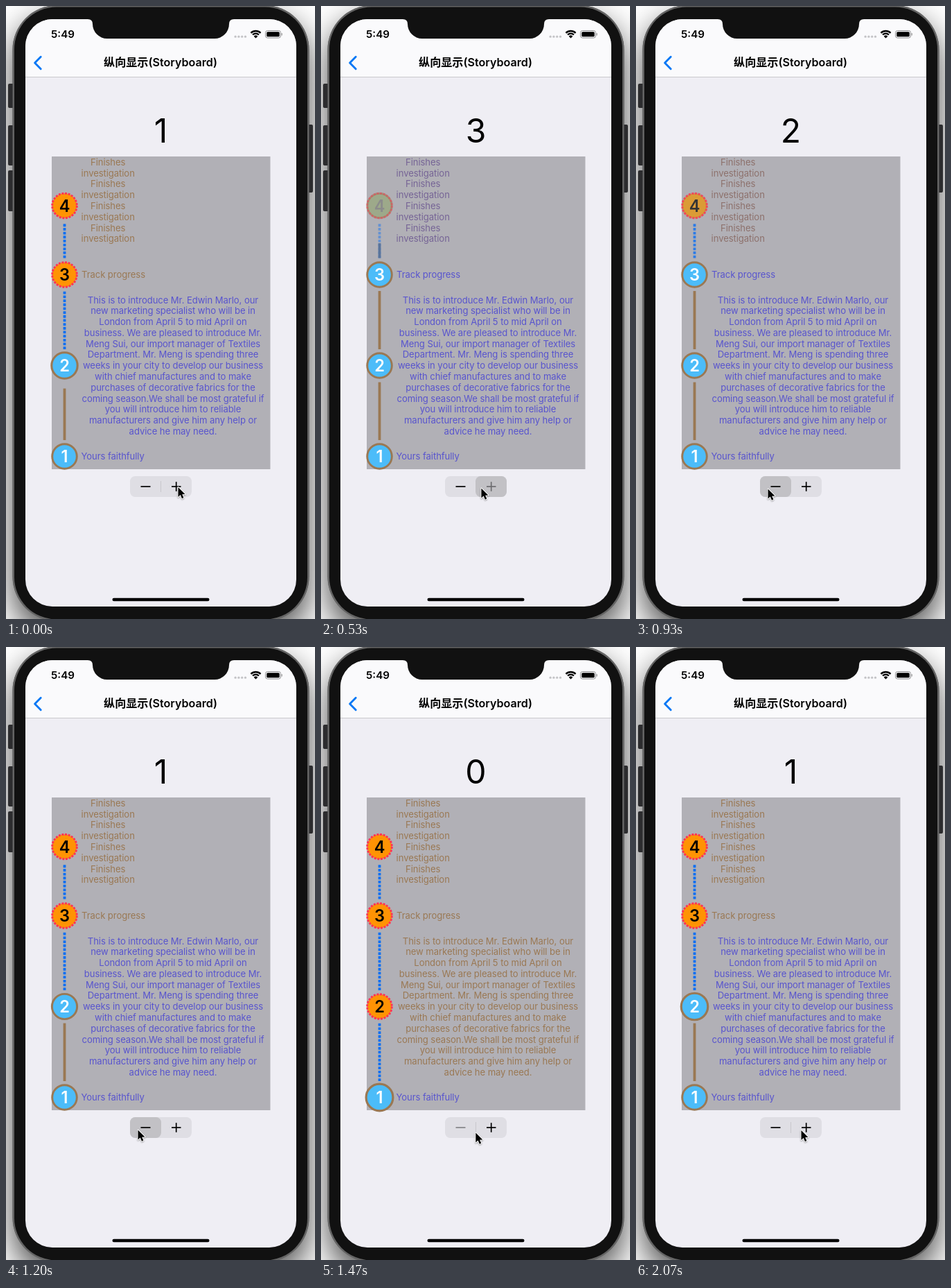
Write an HTML page with a canvas that moves like this. It is 446 by 884 pixels and loops after 2140 ms.

```html
<!DOCTYPE html>
<html lang="en">
<head>
<meta charset="utf-8">
<style>
html, body { margin: 0; width: 100%; height: 100%; overflow: hidden; background: #fff; }
canvas { display: block; width: 446px; height: 884px; }
</style>
</head>
<body>
<canvas id="stage"></canvas>
<script>
const W = 446, H = 884, LOOP = 2140, FPS = 15;
const canvas = document.getElementById('stage');
const dpr = window.devicePixelRatio || 1;
canvas.width = W * dpr;
canvas.height = H * dpr;
const ctx = canvas.getContext('2d');
const FONT = 'Inter, "Noto Sans CJK SC", "Noto Sans CJK", Roboto, sans-serif';

const BROWN = [154, 120, 83], INDIGO = [88, 84, 206], ORANGE = [255, 147, 4],
      SKY = [76, 188, 249], BLUE = [11, 111, 242], BLACK = [0, 0, 0], WHITE = [255, 255, 255];
const NODE_X = 84.5, LINE_H = 15.77, FADE = 180, GROW = 230;

const investigation = [];
for (let i = 0; i < 4; i++) investigation.push('Finishes', 'investigation');

const letter = [
  'This is to introduce Mr. Edwin Marlo, our',
  'new marketing specialist who will be in',
  'London from April 5 to mid April on',
  'business. We are pleased to introduce Mr.',
  'Meng Sui, our import manager of Textiles',
  'Department. Mr. Meng is spending three',
  'weeks in your city to develop our business',
  'with chief manufactures and to make',
  'purchases of decorative fabrics for the',
  'coming season.We shall be most grateful if',
  'you will introduce him to reliable',
  'manufacturers and give him any help or',
  'advice he may need.'
];

// Steps from bottom to top; line = [top, bottom] of the link below the node
const steps = [
  { y: 649.5, lines: ['Yours faithfully'], x: 108.5, top: 649.5, align: 'left' },
  { y: 518.5, lines: letter, x: 241, top: 424, align: 'center', line: [542.5, 626] },
  { y: 387.5, lines: ['Track progress'], x: 109, top: 387.5, align: 'left', line: [411, 495] },
  { y: 288, lines: investigation, x: 147.2, top: 225.3, align: 'center', line: [313.5, 363.5] }
];

// Stepper value changes: [time, value, release time]
const presses = [
  [-205, 1, -60], [130, 2, 300], [435, 3, 585], [790, 2, 950],
  [1020, 1, 1205], [1220, 0, 1400], [1702, 1, 1880]
];

// Pointer path: [time, x, y]
const path = [
  [0, 248, 694], [400, 248, 694], [533, 231, 695.5], [680, 190, 696.5],
  [1400, 190, 696.5], [1467, 223, 700.5], [1580, 238, 697], [LOOP, 238, 697]
];

const clamp = v => Math.max(0, Math.min(1, v));
const mix = (a, b, p) => 'rgb(' + a.map((v, i) => Math.round(v + (b[i] - v) * p)) + ')';

function box(x, y, w, h, r, fill) {
  ctx.beginPath();
  ctx.roundRect(x, y, w, h, r);
  ctx.fillStyle = fill;
  ctx.fill();
}

function stroke(points, color, width) {
  ctx.beginPath();
  points.forEach(([x, y], i) => i ? ctx.lineTo(x, y) : ctx.moveTo(x, y));
  ctx.strokeStyle = color;
  ctx.lineWidth = width;
  ctx.stroke();
}

function text(str, x, y, size, color, weight = 400, align = 'center', spacing = 0) {
  ctx.font = `${weight} ${size}px ${FONT}`;
  ctx.letterSpacing = spacing + 'px';
  ctx.textAlign = align;
  ctx.fillStyle = color;
  ctx.fillText(str, x, y);
}

function drawPhone() {
  ctx.fillStyle = '#fff';
  ctx.fillRect(0, 0, W, H);
  ctx.save();
  ctx.shadowColor = 'rgba(0,0,0,.7)';
  ctx.shadowBlur = 46 * dpr;
  ctx.shadowOffsetY = 20 * dpr;
  box(9.5, -1, 428, 888, 64, '#646464');
  ctx.restore();
  for (const [y, h] of [[112, 35], [172, 58], [237, 59]]) box(3, y, 8, h, 2, '#2c2c2e');
  box(435, 171, 8, 98, 2, '#2c2c2e');
  box(9.5, -1, 428, 888, 64, '#646464');
  box(12, 1.5, 423, 883, 61, '#111');

  ctx.save();
  ctx.beginPath();
  ctx.roundRect(28, 19, 391, 847, 39);
  ctx.clip();
  ctx.fillStyle = '#efeef4';
  ctx.fillRect(28, 19, 391, 847);
  ctx.fillStyle = '#fafafc';
  ctx.fillRect(28, 19, 391, 83);
  ctx.fillStyle = '#c9c9cd';
  ctx.fillRect(28, 102, 391, 1);
  ctx.restore();

  // Notch
  ctx.beginPath();
  ctx.moveTo(118, 18);
  ctx.lineTo(118, 19);
  ctx.quadraticCurveTo(125, 19, 125, 26);
  ctx.arcTo(125, 47, 147, 47, 21);
  ctx.arcTo(322, 47, 322, 26, 21);
  ctx.lineTo(322, 26);
  ctx.quadraticCurveTo(322, 19, 329, 19);
  ctx.lineTo(329, 18);
  ctx.fillStyle = '#111';
  ctx.fill();
}

function drawBars() {
  text('5:49', 82, 46, 15.2, '#000', 600);
  for (let i = 0; i < 4; i++) box(329.5 + i * 4.8, 42.6, 3.2, 3.2, 1.6, '#c3c3c6');

  // Wi-Fi fan
  ctx.lineWidth = 2.3;
  ctx.strokeStyle = ctx.fillStyle = '#000';
  for (const r of [10, 6.3]) {
    ctx.beginPath();
    ctx.arc(360.5, 46, r, -Math.PI * .75, -Math.PI * .25);
    ctx.stroke();
  }
  ctx.beginPath();
  ctx.moveTo(360.5, 46.5);
  ctx.arc(360.5, 46.5, 4, -Math.PI * .75, -Math.PI * .25);
  ctx.fill();

  // Battery
  ctx.beginPath();
  ctx.roundRect(374.5, 35.5, 22, 10.5, 3);
  ctx.lineWidth = 1;
  ctx.strokeStyle = '#8e8e90';
  ctx.stroke();
  box(376.2, 37.2, 18.6, 7.1, 1.6, '#000');
  box(397.6, 39, 1.3, 3.6, .6, '#a0a0a2');

  ctx.lineCap = ctx.lineJoin = 'round';
  stroke([[50.2, 73.3], [41.6, 82], [50.2, 90.7]], '#0a78f5', 2.9);
  ctx.lineCap = 'butt';
  ctx.lineJoin = 'miter';
  text('纵向显示(Storyboard)', 223, 87, 16.1, '#000', 600);
  box(153.5, 853.7, 140, 4.6, 2.3, '#000');
}

function drawLink([top, bottom], p, grow) {
  ctx.globalAlpha = 1 - p;
  ctx.setLineDash([3.78, 1.89]);
  stroke([[NODE_X, bottom], [NODE_X, top]], mix(BLUE, BLUE, 0), 3.8);
  ctx.setLineDash([]);
  ctx.globalAlpha = 1;
  if (grow > 0) stroke([[NODE_X, bottom], [NODE_X, bottom - (bottom - top) * grow]], mix(BLUE, BROWN, p), 3.8);
}

function drawNode(n, y, p, scale) {
  ctx.save();
  ctx.translate(NODE_X, y);
  ctx.scale(scale, scale);
  ctx.beginPath();
  ctx.arc(0, 0, 17.8, 0, Math.PI * 2);
  ctx.fillStyle = mix(ORANGE, SKY, p);
  ctx.fill();
  ctx.lineWidth = 2.9;
  ctx.globalAlpha = p;
  ctx.strokeStyle = mix(BROWN, BROWN, 0);
  ctx.stroke();
  ctx.globalAlpha = 1 - p;
  const unit = Math.PI * 2 * 17.8 / 24;
  ctx.setLineDash([unit * .64, unit * .36]);
  ctx.strokeStyle = '#ff3355';
  ctx.stroke();
  ctx.restore();
  text(n, NODE_X, y + 8.5, 23.6, mix(BLACK, WHITE, p), 600);
}

function drawStep(s, i, t, value, age) {
  let isDone = i < 2, changed = -1e4, before = 1;
  for (const [at, v] of presses) {
    if (at > t) break;
    if ((v >= i) !== (before >= i) || (at < 0 && i === 1)) {
      changed = at;
      isDone = v >= i;
    }
    before = v;
  }
  const k = clamp((t - changed) / FADE);
  const p = isDone ? k : 1 - k;
  const grow = isDone ? clamp((t - changed) / GROW) : k < .5 ? 1 - 2 * k : 0;
  const beat = value === i ? clamp((age - 165) / 270) : 0;

  if (s.line) drawLink(s.line, p, grow);
  drawNode(i + 1, s.y, p, 1 + .11 * Math.sin(Math.PI * beat));
  s.lines.forEach((line, j) =>
    text(line, s.x, s.top + 4.6 + j * LINE_H, 13.1, mix(BROWN, INDIGO, p), 400, s.align, -0.08));
}

function drawStepper(value, side) {
  box(179, 678, 89, 30, 7.5, '#dfdee4');
  if (side) box(side < 0 ? 179 : 223, 678, 45, 30, 7.5, '#c2c1c5');
  else {
    ctx.fillStyle = '#c8c7cc';
    ctx.fillRect(223, 685, 1, 16);
  }
  const minus = value === 0 ? '#858588' : '#000';
  const plus = value === 3 ? '#6c6c6f' : '#000';
  stroke([[194.5, 693], [208.5, 693]], minus, 1.7);
  stroke([[239, 693], [252.5, 693]], plus, 1.7);
  stroke([[245.7, 686.2], [245.7, 699.8]], plus, 1.7);
}

function drawPointer(t) {
  const i = path.findIndex(k => k[0] > t);
  const a = path[i - 1], b = path[i];
  const p = (t - a[0]) / (b[0] - a[0]);
  ctx.save();
  ctx.translate(a[1] + (b[1] - a[1]) * p, a[2] + (b[2] - a[2]) * p);
  ctx.beginPath();
  [[.5, 0], [.5, 14], [3.7, 11], [6, 16.2], [8.4, 15.1], [6.2, 10.2], [10.5, 10]]
    .forEach(([x, y]) => ctx.lineTo(x, y));
  ctx.closePath();
  ctx.lineJoin = 'round';
  ctx.lineWidth = 2;
  ctx.strokeStyle = '#fff';
  ctx.shadowColor = 'rgba(0,0,0,.35)';
  ctx.shadowBlur = 2 * dpr;
  ctx.shadowOffsetY = dpr;
  ctx.stroke();
  ctx.shadowColor = 'transparent';
  ctx.fillStyle = '#000';
  ctx.fill();
  ctx.restore();
}

function draw(now) {
  const t = Math.floor((now % LOOP + 4) * FPS / 1000) * 1000 / FPS;
  const n = presses.filter(e => e[0] <= t).length - 1;
  const [at, value, release] = presses[n];
  const side = t < release ? (n === 0 || value > presses[n - 1][1] ? 1 : -1) : 0;

  ctx.setTransform(dpr, 0, 0, dpr, 0, 0);
  drawPhone();
  drawBars();
  text(value, 223.5, 197, 48, '#000');
  box(66, 217, 315.5, 451, 0, '#b1b0b6');
  steps.forEach((s, i) => drawStep(s, i, t, value, t - at));
  drawStepper(value, side);
  drawPointer(t);
}

const start = performance.now();
function tick() {
  draw(performance.now() - start);
  requestAnimationFrame(tick);
}
tick();
</script>
</body>
</html>
```
